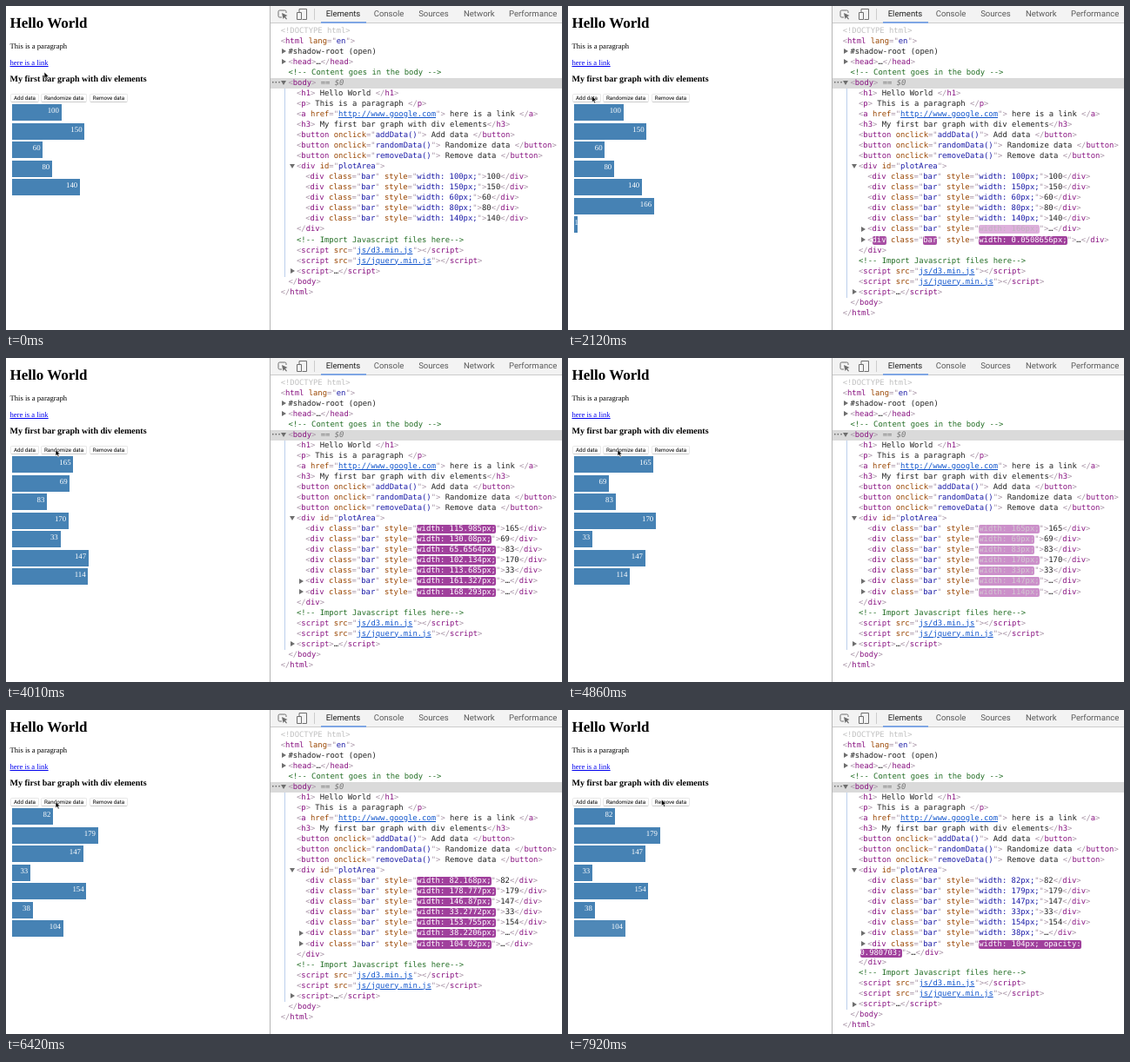
An HTML page that plays this animation: 639x373 px, repeating every 8 s.

```html
<!DOCTYPE html>
<html lang="en">
<head>
<meta charset="utf-8">
<title>Bar graph</title>
<style>
html, body { margin: 0; width: 100%; height: 100%; overflow: hidden; background: #fff; }
#stage { position: relative; width: 639px; height: 373px; overflow: hidden; text-rendering: geometricPrecision; }
#stage > *, .row, .bar, .tab, .btn, .arrow { position: absolute; }
.serif { left: 4.5px; height: 20px; line-height: 20px; white-space: pre; color: #000; font-family: "Liberation Serif", Times, serif; font-size: 8.6px; }
.btn { top: 101px; height: 10px; box-sizing: border-box; border: 1px solid #e8e8e8; border-bottom-color: #ccc; border-radius: 2px; text-align: center; font: 6.25px/8.5px Roboto, sans-serif; color: #000; white-space: pre; }
.bar { left: 7px; height: 18.7px; padding: 0 2.8px 0 .6px; background: #4682b4; color: #fff; text-align: right; font: 8.8px/15.5px "Liberation Serif", Times, serif; }
#tools { left: 304px; top: 0; width: 335px; height: 19px; background: #f3f3f3; border-bottom: 1px solid #ccc; }
.tab { top: 0; line-height: 19px; font-family: Roboto, sans-serif; font-size: 9.55px; color: #5a5a5a; }
.row { height: 12px; line-height: 12px; white-space: pre; font-family: "DejaVu Sans Mono", monospace; font-size: 8.87px; color: #881280; }
.row i { font-style: normal; }
.p { color: #a894a6; } .n { color: #994500; } .v { color: #1a1aa6; }
.t { color: #222; } .c { color: #236e25; } .g { color: #c0c0c0; } .d { color: #777; }
.u { color: #15c; text-decoration: underline; }
.flash { border-radius: 2px; }
.arrow { border: 3.3px solid transparent; }
.shut { border-left: 5.6px solid #6e6e6e; border-right: 0; }
.open { border-top: 5.6px solid #6e6e6e; border-bottom: 0; }
</style>
</head>
<body>
<div id="stage">
  <div class="serif" style="top:10px;font-size:17px;font-weight:bold">Hello World</div>
  <div class="serif" style="top:36px">This is a paragraph</div>
  <div class="serif" style="top:54.5px;color:#00e;text-decoration:underline">here is a link</div>
  <div class="serif" style="top:75px;font-size:10px;font-weight:bold">My first bar graph with div elements</div>
  <div class="btn" style="left:5px;width:33px">Add data</div>
  <div class="btn" style="left:40px;width:53px">Randomize data</div>
  <div class="btn" style="left:96px;width:44px">Remove data</div>
  <div id="plot" style="left:0;top:0"></div>
  <div style="left:303px;top:0;width:1px;height:373px;background:#b5b5b5"></div>
  <div id="tools">
    <svg width="60" height="19" fill="none" stroke="#6e6e6e" style="position:absolute;left:0;top:0">
      <path d="M13 13H10.500Q9 13 9 11.500V6.500Q9 5 10.500 5H16.500Q18 5 18 6.500V8"/>
      <path d="M13 8L19.500 11L17 12L19 15L18 15.500L16 13L14.500 15Z" fill="#6e6e6e" stroke="none"/>
      <path d="M33 7V3.500H41.500V15.500H36.500M30.500 7.500H35.500V15.500H30.500Z"/>
      <path d="M50.500 3V16" stroke="#ccc"/>
    </svg>
    <div style="position:absolute;left:58px;top:18px;width:52px;height:2px;background:#7fa6e4"></div>
    <span class="tab" style="left:63.700px;color:#222">Elements</span>
    <span class="tab" style="left:118.700px">Console</span>
    <span class="tab" style="left:170.200px">Sources</span>
    <span class="tab" style="left:222px">Network</span>
    <span class="tab" style="left:274px">Performance</span>
  </div>
  <div style="left:304px;top:83px;width:335px;height:11.500px;background:#dadada"></div>
  <div id="guide" style="left:320px;top:95px;width:1px;background:#bcd0ec"></div>
  <div id="tree" style="left:0;top:0"></div>
  <svg id="cursor" width="9" height="12" viewBox="-1 -1 9 12" style="left:-1px;top:-1px">
    <path d="M0 0V7.300L1.700 5.800L2.900 8.500L4.200 7.900L3 5.300H5.300Z" fill="#000" stroke="#fff" stroke-width=".6"/>
  </svg>
</div>
<script>
const LOOP = 8000, LAG = 67; // the inspector trails the page slightly
const TICKS = [0, 100, 270, 440, 610, 780, 950, 1130, 1340, 1540, 1730, 1920, 2120, 2320,
  2540, 2790, 3040, 3250, 3420, 3610, 3810, 4010, 4200, 4410, 4630, 4860, 5040, 5230,
  5420, 5600, 5780, 5960, 6190, 6420, 6630, 6840, 7010, 7190, 7380, 7560, 7740, 7920];
const VALUES = [[100, 165, 82], [150, 69, 179], [60, 83, 147], [80, 170, 33],
  [140, 33, 154], [166, 147, 38], [186, 114, 104]];
const ADDS = { 5: [790, 950], 6: [2081.1545, 950] };
const SHUFFLES = [[3615.315, 1000], [5495.6921, 1004.334]];
const REMOVE = 7751.03;
const PATH = [[0, 44, 76], [100, 44, 76], [700, 27.5, 103.5], [2350, 27.5, 103.5],
  [2900, 57, 105.5], [6900, 57, 105.5], [7500, 107.5, 103], [LOOP, 107.5, 103]];

const $ = id => document.getElementById(id);
const clamp = x => Math.min(1, Math.max(0, x));
const mix = (a, b, k) => a + (b - a) * k;
const cubic = x => x < .5 ? 4 * x ** 3 : 1 - 4 * (1 - x) ** 3;
const short = x => +x.toPrecision(6);

function barAt(i, t) {
  const added = ADDS[i] || [-9000, 1];
  if (t < added[0]) return null;
  const moves = [added, ...SHUFFLES];
  const k = moves.filter(m => t >= m[0]).length - 1;
  const [start, dur] = moves[k];
  const to = VALUES[i][k], from = k ? VALUES[i][k - 1] : 0;
  const leaving = i === 6 && t >= REMOVE;
  return {
    label: to, leaving,
    width: mix(from, to, cubic(clamp((t - start) / dur))),
    opacity: leaving ? 1 - cubic(clamp((t - REMOVE) / 1000)) : 1,
    age: leaving ? 0 : Math.max(0, t - start - dur),
    born: t - added[0]
  };
}

// Markup helpers for the element tree
const esc = s => s.replace(/&/g, '&amp;').replace(/</g, '&lt;');
const ink = (cls, s) => `<i class="${cls}">${esc(s)}</i>`;
const attr = (name, value) => ' ' + ink('n', name) + ink('p', '="') + value + ink('p', '"');
const open = (name, attrs = '') => ink('p', '<') + name + attrs + ink('p', '>');
const close = name => ink('p', '</') + name + ink('p', '>');
const node = (name, attrs, text) => open(name, attrs) + ink('t', text) + close(name);
const button = (fn, text) => node('button', attr('onclick', ink('v', fn + '()')), ` ${text} `);
const script = src => node('script', attr('src', ink('u', src)), '');

// Purple update highlight that fades over one second
function flash(text, cls, age) {
  if (age >= 1000) return ink(cls, text);
  const k = 1 - (1 - clamp(age / 800)) ** 2, tail = clamp((age - 800) / 200);
  const rgb = (a, b) => a.map((x, j) => Math.round(mix(x, b[j], k)));
  const back = `rgba(${rgb([160, 64, 156], [245, 219, 244])},${1 - tail})`;
  const color = tail ? '' : `;color:rgb(${rgb([255, 255, 255], [168, 148, 166])})`;
  return `<i class="flash ${cls}" style="background:${back}${color}">${text}</i>`;
}

function drawTree(t) {
  let y = 22.7, html = '';
  const row = (x, content, arrow, step = 12.04) => {
    if (arrow) {
      const shut = arrow === 'shut';
      html += `<b class="arrow ${arrow}" style="left:${x - (shut ? 7 : 8)}px;top:${y + (shut ? 2.4 : 3)}px"></b>`;
    }
    html += `<div class="row" style="left:${x}px;top:${y}px">${content}</div>`;
    y += step;
  };
  const [L0, L1, L2, L3] = [315.7, 324.4, 334, 344.2];
  row(L0, ink('g', '<!DOCTYPE html>'));
  row(L0, open('html', attr('lang', ink('v', 'en'))));
  row(L1, ink('t', '#shadow-root (open)'), 'shut');
  row(L1, node('head', '', '…'), 'shut');
  row(L1, ink('c', '<!-- Content goes in the body -->'));
  html += `<div class="row" style="left:305px;top:${y}px;font-size:6px;color:#666">•••</div>`;
  row(L1, open('body') + ink('d', ' == ') + '<em class="d">$0</em>', 'open');
  row(L2, node('h1', '', ' Hello World '));
  row(L2, node('p', '', ' This is a paragraph '));
  row(L2, node('a', attr('href', ink('u', 'http:\/\/www.google.com')), ' here is a link '));
  row(L2, node('h3', '', ' My first bar graph with div elements'));
  row(L2, button('addData', 'Add data'));
  row(L2, button('randomData', 'Randomize data'));
  row(L2, button('removeData', 'Remove data'));
  row(L2, open('div', attr('id', ink('v', 'plotArea'))), 'open');
  VALUES.forEach((_, i) => {
    const bar = barAt(i, t);
    if (!bar) return;
    const fresh = i > 4, born = fresh ? bar.born : 9999;
    const head = ink('p', '<') + (fresh ? flash('div', '', born) : 'div') +
      attr('class', flash('bar', 'v', born)) + ' ' + ink('n', 'style') + ink('p', '="');
    const tail = ink('p', '">') + ink('t', fresh ? '…' : '' + bar.label) + close('div');
    const style = `width: ${short(bar.width)}px;`;
    const arrow = fresh && 'shut';
    if (bar.leaving) {
      row(L3, head + flash(style + ' opacity:', 'v', 0), arrow, 10.3);
      row(335.5, flash(short(bar.opacity) + ';', 'v', 0) + tail, '', 11.2);
    } else row(L3, head + flash(style, 'v', bar.age) + tail, arrow);
  });
  row(L2, close('div'));
  row(L2, ink('c', '<!-- Import Javascript files here-->'));
  row(L2, script('js/d3.min.js'));
  row(L2, script('js/jquery.min.js'));
  row(L2, node('script', '', '…'), 'shut');
  $('guide').style.height = y - 95 + 'px';
  row(L1, close('body'));
  row(L0, close('html'));
  $('tree').innerHTML = html;
}

function drawPlot(t) {
  $('plot').innerHTML = VALUES.map((_, i) => {
    const bar = barAt(i, t);
    return bar ? `<div class="bar" style="top:${113.4 + i * 21.5}px;width:${bar.width * .533}px;opacity:${bar.opacity}">${bar.label}</div>` : '';
  }).join('');
}

function drawCursor(t) {
  const k = PATH.findIndex(p => p[0] > t), a = PATH[k - 1], b = PATH[k];
  const u = (t - a[0]) / (b[0] - a[0]), e = u * u * (3 - 2 * u);
  $('cursor').style.transform = `translate(${mix(a[1], b[1], e)}px,${mix(a[2], b[2], e)}px)`;
}

let shown = -1;
function frame() {
  const now = performance.now() % LOOP;
  const t = TICKS.filter(x => x <= now).pop();
  if (t !== shown) {
    shown = t;
    drawPlot(t + LAG);
    drawTree(t);
    drawCursor(t);
  }
  requestAnimationFrame(frame);
}
frame();
</script>
</body>
</html>
```
